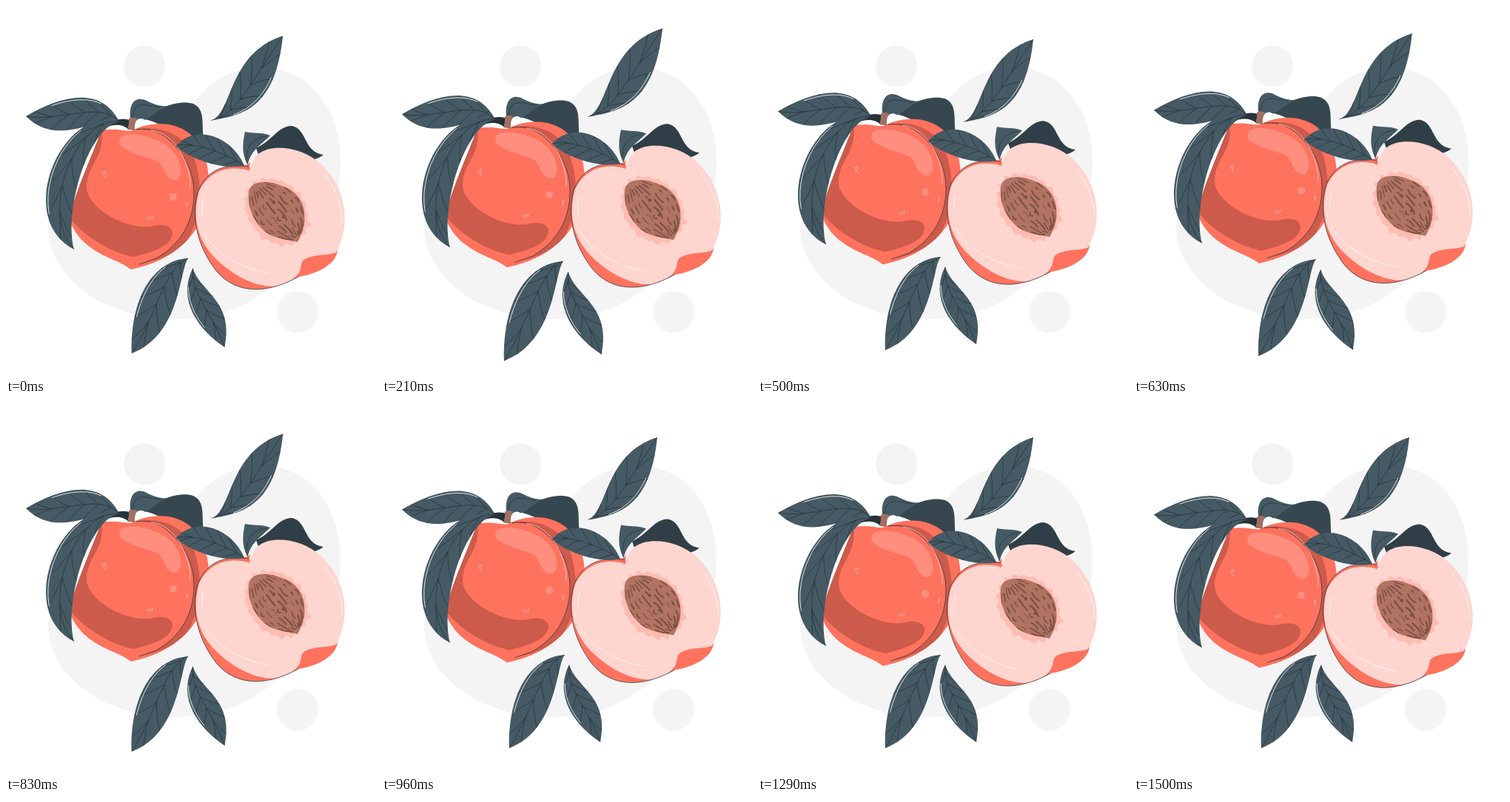
Write an HTML page with a canvas that moves like this. It is 500 by 500 pixels and loops after 1540 ms.

```html
<!DOCTYPE html>
<html lang="en">
<head>
<meta charset="utf-8">
<title>Peaches</title>
<style>
html, body { margin: 0; width: 100%; height: 100%; overflow: hidden; background: #fff; }
canvas { display: block; width: 100vw; height: 100vh; }
</style>
</head>
<body>
<canvas id="stage" width="500" height="500"></canvas>
<script>
const ctx = document.getElementById('stage').getContext('2d');
const LOOP = 1540, CYCLE = 1500, STEPS = 36;
const C = {
  grey: '#f4f4f4', leaf: '#455a64', deep: '#37474f', dark: '#303f47', ink: '#263238',
  skin: '#ff725e', shade: '#cc5b4b', glow: '#ff8e7e', flesh: '#ffd5cf',
  halo: '#ffbcb2', pit: '#b17362', groove: '#7b5045', stem: '#a26f62'
};

const shape = d => new Path2D(d);

function fill(path, color) {
  ctx.fillStyle = color;
  ctx.fill(path);
}

function line(path, color, width = 0.7) {
  ctx.strokeStyle = color;
  ctx.lineWidth = width;
  ctx.stroke(path);
}

function disc(x, y, r, color) {
  const path = new Path2D();
  path.arc(x, y, r, 0, 7);
  fill(path, color);
}

function clipped(path, paint) {
  ctx.save();
  ctx.clip(path);
  paint();
  ctx.restore();
}

function randomizer(seed) {
  return () => (seed = seed * 16807 % 2147483647) / 2147483647;
}

const mix = (a, b, k) => a.map((v, i) => v + (b[i] - v) * k);

function pointOn([a, b, c, d], t) {
  const s = 1 - t;
  return a.map((v, i) => s * s * s * v + 3 * s * s * t * b[i] + 3 * s * t * t * c[i] + t * t * t * d[i]);
}

// A leaf is two cubic edges from base to tip; midrib, veins and gleam follow from them.
function makeLeaf(base, tip, edge, other, gleaming = true) {
  const left = [base, ...edge, tip], right = [base, ...other, tip];
  const rib = left.map((p, i) => mix(p, right[i], 0.5));
  const trace = (path, curve) => path.bezierCurveTo(...curve[1], ...curve[2], ...curve[3]);
  const body = new Path2D(), veins = new Path2D(), gleam = new Path2D();

  body.moveTo(...base);
  trace(body, left);
  trace(body, [...right].reverse());
  veins.moveTo(...base);
  trace(veins, rib);
  for (let t = 0.12; t < 0.8; t += 0.155) {
    for (const side of [left, right]) {
      const from = pointOn(rib, t), bend = pointOn(rib, t + 0.06);
      const to = pointOn(side, t + 0.17);
      veins.moveTo(...from);
      veins.quadraticCurveTo(...mix(bend, to, 0.55), ...to);
    }
  }
  for (let t = 0.25; t < 0.8; t += 0.05) gleam.lineTo(...mix(pointOn(left, t), pointOn(rib, t), 0.14));

  return () => {
    fill(body, C.leaf);
    clipped(body, () => line(veins, C.ink));
    if (gleaming) line(gleam, '#eef2f3', 0.9);
  };
}

const blob = shape('M258 125C280 98 312 83 345 83C410 83 452 140 452 208C452 300 400 350 360 378C325 405 290 423 228 423C130 423 57 365 57 300C57 250 150 190 258 125');

const looseLeaves = [
  makeLeaf([276, 157], [372, 45], [[318, 150], [362, 142]], [[306, 150], [298, 68]]),
  makeLeaf([247, 339], [172, 465], [[200, 342], [170, 392]], [[235, 352], [238, 440]]),
  makeLeaf([253, 352], [295, 457], [[236, 385], [248, 425]], [[262, 384], [308, 395]])
];

const peachLeaves = [
  makeLeaf([153, 156], [27, 149], [[127, 106], [72, 123]], [[128, 147], [70, 193]]),
  makeLeaf([153, 156], [92, 329], [[75, 134], [10, 287]], [[111, 165], [78, 275]])
];

const halfLeaf = makeLeaf([322, 216], [230, 189], [[306, 177], [257, 158]], [[292, 222], [246, 206]], false);

const peach = {
  backLeaf: shape('M188 153C200 138 235 126 253 132C270 140 264 160 267 179C235 178 215 160 188 153'),
  fold: shape('M168 151C166 130 176 121 190 128C202 134 210 136 220 135C205 140 200 148 188 154C182 150 177 152 174 158Z'),
  foldRib: shape('M171 152C172 128 186 133 208 137'),
  back: shape('M169 169C185 160 225 150 252 176C268 194 274 215 274 238C274 300 235 342 169 356Z'),
  crease: shape('M172 168C200 160 240 168 254 205C268 245 262 290 245 316C230 335 205 344 180 349Z'),
  front: shape('M129 168C150 165 158 169 168 169C180 166 205 163 228 188C246 208 254 230 254 254C254 290 237 322 203 341C190 347 180 347 169 356C155 346 150 346 130 336C108 324 95 312 86 290C88 265 115 205 129 168'),
  shade: shape('M129 168C134 205 109 215 109 245C109 272 160 302 195 298C212 294 222 296 225 305C226 324 200 332 172 339C145 334 105 312 86 286C88 262 115 205 129 168'),
  glow: shape('M153 182C155 165 205 175 224 194C240 212 240 235 228 236C213 234 214 213 203 209C185 203 150 194 153 182'),
  edge: shape('M176 167C190 165 208 166 228 188C246 208 254 230 254 254C254 290 237 322 203 341L180 349'),
  shine: shape('M196 168C230 172 250 215 249 246'),
  collar: shape('M133 165Q146 149 167 154L165 166Q152 156 133 165'),
  stem: shape('M166 152Q171 149 177 152Q173 160 174 168L164 167Q167 160 166 152'),
  ticks: shape('M130 224l3 4M133 223l2 3M132 229l3 3M191 286l2 3M194 284l1 3M198 284l-1 3M245 265l-1 6')
};

const half = {
  leaf: shape('M326 214C318 198 320 184 323 170C335 173 345 170 357 175C348 185 330 195 327 214'),
  leafRib: shape('M325 206C325 186 336 178 352 176'),
  dark: shape('M338 192C360 182 368 162 386 162C407 165 402 198 429 201C420 208 412 209 400 206L345 212Z'),
  skin: shape('M328 217C295 212 270 222 259 252C250 285 258 325 285 359C310 388 350 391 395 366C420 362 445 350 448 331Z'),
  flesh: shape('M329 222C300 215 275 222 261 250C252 282 256 315 285 343C315 372 360 390 385 371C405 358 394 348 404 342C420 334 435 338 446 333C470 290 455 240 425 213C400 190 360 186 342 199C333 206 332 214 329 222'),
  notch: shape('M310 214C322 217 331 216 331 205L328 223Q320 217 308 217'),
  rim: shape('M328 217C295 212 270 222 259 252C250 285 258 325 285 359C310 388 350 391 395 366'),
  shines: shape('M267 306C284 338 325 356 355 361M267 262Q263 273 265 284M430 228Q453 254 455 292'),
  pit: shape('M328 252C330 232 362 236 384 248C405 262 406 285 401 304Q397 313 394 319C380 315 360 316 345 300C332 286 326 268 328 252')
};

// Position inside the tilted pit: u runs along its axis, v across it.
function inPit(u, v) {
  const a = 44 * u, b = 35 * v, tilt = 0.9;
  return [366 + a * Math.cos(tilt) - b * Math.sin(tilt), 278 + a * Math.sin(tilt) + b * Math.cos(tilt)];
}

function makeHalo() {
  const rand = randomizer(5), path = new Path2D();
  for (let i = 0; i < 40; i++) {
    const a = i * Math.PI / 20, r = i % 2 ? 1.05 : 1.1 + rand() * 0.13;
    path.lineTo(...inPit(r * Math.cos(a), r * Math.sin(a)));
  }
  return path;
}

// Broken grooves along the meridians, wavier towards the lower end.
function makeGrooves() {
  const rand = randomizer(11), list = [];
  for (let v = -0.9; v < 0.95; v += 0.2) {
    for (let u = -0.94 + rand() * 0.15; u < 0.9;) {
      const size = 0.08 + rand() * 0.36, wave = (rand() - 0.5) * (0.25 + 0.2 * u), path = new Path2D();
      const at = (x, y) => inPit(x, y * Math.sqrt(Math.max(0, 1 - x * x)));
      path.moveTo(...at(u, v));
      path.quadraticCurveTo(...at(u + size / 2, v + wave), ...at(Math.min(u + size, 0.96), v));
      list.push([path, 0.9 + rand() * 1.4]);
      u += size + 0.12 + rand() * 0.18;
    }
  }
  return list;
}

const halo = makeHalo(), grooves = makeGrooves();

function drawPeach() {
  fill(peach.backLeaf, C.deep);
  fill(peach.fold, C.leaf);
  line(peach.foldRib, C.ink);
  fill(peach.back, C.skin);
  clipped(peach.back, () => fill(peach.crease, C.shade));
  fill(peach.front, C.skin);
  clipped(peach.front, () => fill(peach.shade, C.shade));
  fill(peach.glow, C.glow);
  disc(226, 258, 5.2, C.glow);
  line(peach.edge, C.ink);
  line(peach.shine, C.flesh, 0.8);
  line(peach.ticks, '#ffe3de', 0.8);
  fill(peach.collar, C.ink);
  fill(peach.stem, C.stem);
  peachLeaves.forEach(draw => draw());
}

function drawHalf() {
  fill(half.dark, C.dark);
  fill(half.leaf, C.leaf);
  line(half.leafRib, C.ink);
  fill(half.skin, C.skin);
  fill(half.flesh, C.flesh);
  fill(half.notch, C.skin);
  line(half.rim, C.ink);
  line(half.shines, '#fff', 0.8);
  fill(halo, C.halo);
  fill(half.pit, C.pit);
  clipped(half.pit, () => {
    for (const [path, width] of grooves) line(path, C.groove, width);
    disc(375, 285, 2.2, C.groove);
    disc(362, 265, 2.2, C.groove);
  });
  halfLeaf();
}

// Two beats: a quick swell with a slow release, then an even one.
function beat(p) {
  if (p < 0.1) return p / 0.1;
  if (p < 0.3) return (0.3 - p) / 0.2;
  return Math.max(0, 1 - Math.abs(p - 0.5) / 0.1);
}

function render(now) {
  const step = Math.min(STEPS, Math.floor((now % LOOP) / 41.62 + 0.1));
  const phase = Math.min(1, step / STEPS + 32 / CYCLE);
  const lift = 10 * (1 - Math.abs(1 - 2 * phase));
  const scale = 1 + 0.1 * beat(phase);

  ctx.fillStyle = '#fff';
  ctx.fillRect(0, 0, 500, 500);
  fill(blob, C.grey);
  disc(187.3, 81.3, 28, C.grey);
  disc(394, 413.3, 28, C.grey);

  ctx.save();
  ctx.translate(272, 255);
  ctx.scale(scale, scale);
  ctx.translate(-272, -255);
  looseLeaves.forEach(draw => draw());
  ctx.restore();

  ctx.save();
  ctx.translate(0, 0.4 - lift);
  drawPeach();
  drawHalf();
  ctx.restore();
}

ctx.lineCap = ctx.lineJoin = 'round';
let start;
function tick(now) {
  start ??= now;
  render(now - start);
  requestAnimationFrame(tick);
}
render(0);
requestAnimationFrame(tick);
</script>
</body>
</html>
```
